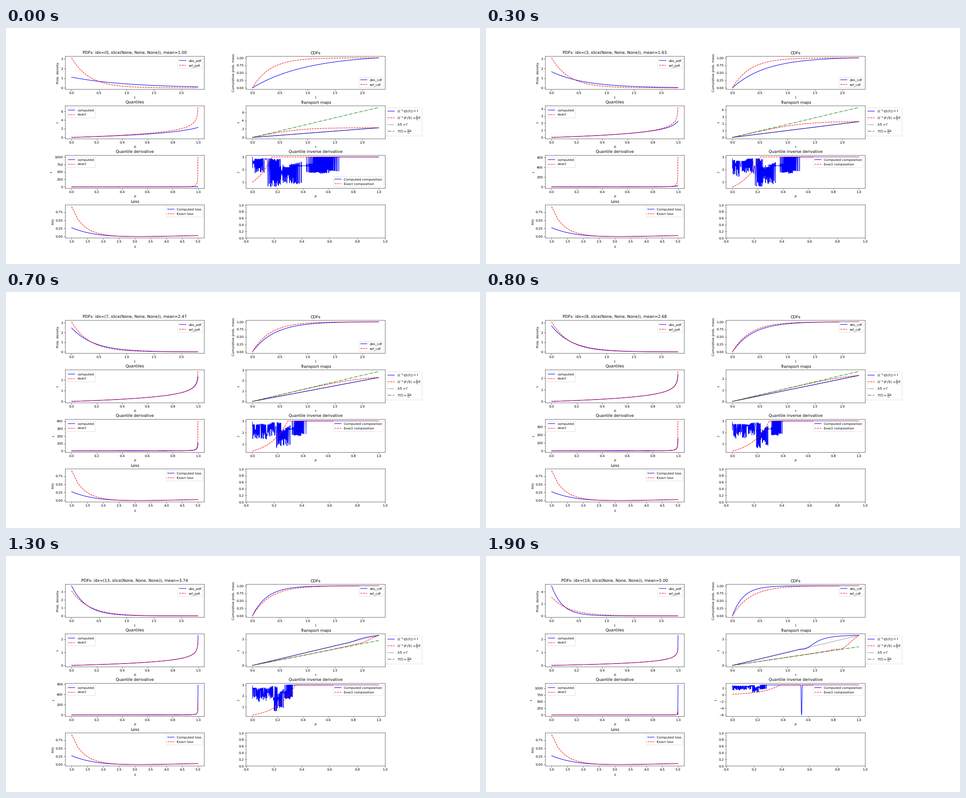
A matplotlib script that plays this animation: 1058 px wide and 529 px high, repeating every 2000 ms.

```python
import numpy as np
import matplotlib.pyplot as plt
from matplotlib.animation import FuncAnimation

# Soft, unsnapped edges and glyphs suit the low resolution
plt.rcParams.update({"path.snap": False, "text.hinting": "none"})

FRAMES, INTERVAL = 20, 100
N = 1000
T_MAX = np.log(10)
CLIP = 3

t = np.linspace(0, T_MAX, N)
p = np.linspace(0, 1, N)
rates = np.linspace(1, 5, FRAMES)
ref = rates[10]


def pdf(rate):
    return rate * np.exp(-rate * t) / (1 - np.exp(-rate * T_MAX))


def cdf(rate):
    mass = 1 - np.exp(-rate * t)
    return mass / mass[-1]


def quantile(rate):
    """Stepwise inverse of the sampled CDF on the grid p."""
    idx = np.searchsorted(cdf(rate), p)
    return t[np.minimum(idx, N - 1)]


def smooth_quantile(rate):
    """Inverse of the truncated CDF in closed form."""
    return -np.log(1 - p * (1 - np.exp(-rate * T_MAX))) / rate


# Natural cubic spline on the uniform grid p
system = 4 * np.eye(N) + np.eye(N, k=1) + np.eye(N, k=-1)
system[0, 0] = system[-1, -1] = 2
solver = np.linalg.inv(system)


class Spline:
    def __init__(self, y):
        self.y = y
        self.step = np.diff(y)
        rhs = np.zeros(N)
        rhs[:-1] += 3 * self.step
        rhs[1:] += 3 * self.step
        self.m = solver @ rhs

    def locate(self, x):
        pos = x * (N - 1)
        k = np.minimum(pos.astype(int), N - 2)
        return k, pos - k

    def value(self, x):
        k, u = self.locate(x)
        m0, m1, d = self.m[k], self.m[k + 1], self.step[k]
        return (self.y[k] + m0 * u * (1 - u) ** 2
                + m1 * u ** 2 * (u - 1) + d * u ** 2 * (3 - 2 * u))

    def slope(self, x):
        k, u = self.locate(x)
        m0, m1, d = self.m[k], self.m[k + 1], self.step[k]
        return (N - 1) * (m0 * (1 - 4 * u + 3 * u ** 2)
                          + m1 * (3 * u ** 2 - 2 * u) + 6 * d * u * (1 - u))


fig, axes = plt.subplots(4, 2, figsize=(20, 10), dpi=52.9)
fig.subplots_adjust(left=0.125, right=0.8, bottom=0.11, top=0.88,
                    wspace=0.3, hspace=0.5)
(ax_pdf, ax_cdf), (ax_q, ax_map), (ax_dq, ax_comp), (ax_loss, _) = axes


def panel(ax, title, xlabel, ylabel, *curves, **legend):
    ax.clear()
    for x, y, style, label in curves:
        ax.plot(x, y, style, label=label)
    ax.set_title(title)
    ax.set_xlabel(xlabel)
    ax.set_ylabel(ylabel)
    ax.legend(**legend)


def draw_loss():
    target = smooth_quantile(ref)
    computed = [np.sum((smooth_quantile(r) - target) ** 2) / (N - 1)
                for r in rates]
    exact = 2 * (1 / rates - 1 / ref) ** 2
    panel(ax_loss, "Loss", r"$\lambda$", "loss",
          (rates, computed, "b-", "Computed loss"),
          (rates, exact, "r--", "Exact loss"))


def update(i):
    rate = rates[i]
    obs_cdf, ref_cdf = cdf(rate), cdf(ref)
    spline = Spline(quantile(rate))
    inner = p[:-1]  # the exact quantile is infinite at p = 1

    panel(ax_pdf, f"PDFs: idx={(i, slice(None))}, mean={rate:.2f}",
          "t", "Prob. density",
          (t, pdf(rate), "b-", "obs_pdf"),
          (t, pdf(ref), "r--", "ref_pdf"))
    panel(ax_cdf, "CDFs", "t", "Cumulative prob. mass",
          (t, obs_cdf, "b-", "obs_cdf"),
          (t, ref_cdf, "r--", "ref_cdf"))
    panel(ax_q, "Quantiles", "p", "t",
          (p, spline.y, "b-", "computed"),
          (inner, -np.log(1 - inner) / rate, "r--", "exact"))
    panel(ax_map, "Transport maps", "t", "t",
          (t, spline.value(obs_cdf), "b-", r"$G^{-1}(G(t)) \approx t$"),
          (t, spline.value(ref_cdf), "r--",
           r"$G^{-1}(F(t)) \approx \frac{\lambda_1}{\lambda_2}t$"),
          (t, t, "k:", r"$I(t) = t$"),
          (t, ref / rate * t, "g-.",
           r"$T(t) = \frac{\lambda_1}{\lambda_2}t$"),
          loc="upper left", bbox_to_anchor=(1, 1),
          labelspacing=0.3, borderpad=0.32)
    panel(ax_dq, "Quantile derivative", "p", "t",
          (p, spline.m * (N - 1), "b-", "computed"),
          (inner, 1 / (rate * (1 - inner)), "r--", "exact"))
    panel(ax_comp, "Quantile inverse derivative", "p", "t",
          (p, np.minimum(spline.slope(obs_cdf), CLIP), "b-",
           "Computed composition"),
          (p, np.minimum(np.exp(ref * t) / rate, CLIP), "r--",
           "Exact composition"))
    return []


draw_loss()
anim = FuncAnimation(fig, update, frames=FRAMES, interval=INTERVAL,
                     init_func=lambda: update(0), repeat=True,
                     repeat_delay=0, blit=False)
plt.show()
```
